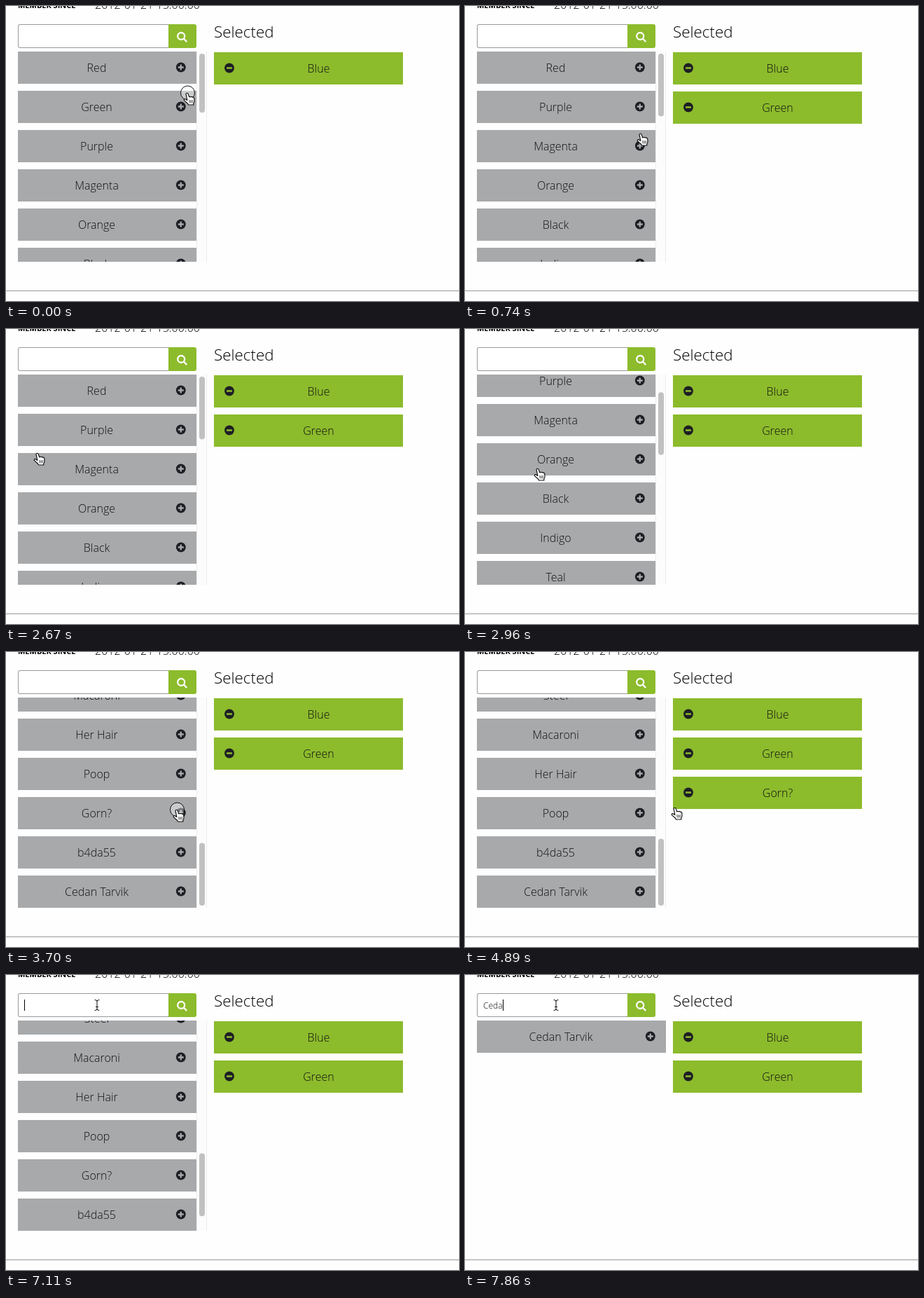
An HTML page with a canvas that plays this animation: 647x421 px, repeating every 8000 ms.

```html
<!DOCTYPE html>
<html lang="en">
<head>
<meta charset="utf-8">
<title>Colour picker</title>
<style>
  html, body { margin: 0; width: 100%; height: 100%; overflow: hidden; background: #fefefe; }
  canvas { display: block; width: 647px; height: 421px; }
</style>
</head>
<body>
<canvas id="stage" width="647" height="421"></canvas>
<script>
const ctx = document.getElementById('stage').getContext('2d');
const LOOP = 8000, STEP = LOOP / 54;
const PAPER = '#fefefe', GREEN = '#8cbb2c', GRAY = '#a7a9ab', DARK = '#1d1e24', INK = '#111';
const FAMILY = '"Open Sans", "Noto Sans", sans-serif';
const ROW = 56, CARD = 46, TOP = 65, VIEW = 300;

const NAMES = ['Red', 'Blue', 'Green', 'Purple', 'Magenta', 'Orange', 'Black', 'Indigo', 'Teal',
  'Brown', 'Silver', 'Gold', 'Steel', 'Macaroni', 'Her Hair', 'Poop', 'Gorn?', 'b4da55', 'Cedan Tarvik'];

// When each name enters and leaves the selection, in steps
const PICKS = [['Blue', 0, 99], ['Green', 1, 99], ['Magenta', 9, 16], ['Gorn?', 26, 37]];
const CLICKS = [0, 8, 15, 25, 36, 41];
const TYPED = { 52: 'Ce', 53: 'Ceda' };

// Pointer path: step, x, y
const PATH = [[0, 259, 124], [2, 257, 138], [4, 252, 172], [7, 248, 201], [8, 247, 203], [10, 247, 203],
  [12, 276, 203], [14, 316, 199], [15, 319, 197], [16, 319, 197], [17, 175, 182], [18, 45, 177],
  [19, 58, 186], [21, 150, 212], [23, 234, 224], [24, 244, 225], [29, 244, 225], [30, 249, 231],
  [31, 262, 238], [32, 281, 235], [33, 300, 222], [34, 321, 209], [37, 319, 203], [38, 286, 150],
  [39, 222, 88], [40, 156, 52], [41, 130, 43], [54, 130, 43]];
const SCROLL = [[0, 0], [19, 0], [20, 70], [21, 240], [22, 440], [23, 590], [24, 642], [54, 642]];

function at(keys, k) {
  const i = Math.max(1, keys.findIndex(p => p[0] >= k));
  const a = keys[i - 1], b = keys[i], f = (k - a[0]) / (b[0] - a[0]);
  return a.slice(1).map((v, j) => v + (b[j + 1] - v) * f);
}

function box(x, y, w, h, color, r = 0) {
  ctx.fillStyle = color;
  ctx.beginPath();
  ctx.roundRect(x, y, w, h, r);
  ctx.fill();
}

function text(s, x, y, size = 16, align = 'left', weight = 300, color = INK) {
  ctx.font = `${weight} ${size}px ${FAMILY}`;
  ctx.textAlign = align;
  ctx.fillStyle = color;
  ctx.fillText(s, x, y);
}

function sign(x, y, color, plus) {
  ctx.fillStyle = DARK;
  ctx.beginPath();
  ctx.arc(x, y, 6.9, 0, 7);
  ctx.fill();
  box(x - 4, y - 1.15, 8, 2.3, color, 0.5);
  if (plus) box(x - 1.15, y - 4, 2.3, 8, color, 0.5);
}

function drawPage() {
  box(0, 0, 647, 421, PAPER);
  text('MEMBER SINCE', 17, 3, 11, 'left', 700, '#000');
  text('2012-01-21 15:00:00', 127, 4, 16, 'left', 300, '#000');
  text('Selected', 297, 45, 22.4, 'left', 300, '#000');
  box(0, 406, 647, 1, '#999');
}

function drawSearch(typed, caret) {
  box(17, 26, 216, 34, '#999', [3, 0, 0, 3]);
  box(18, 27, 214, 32, '#fff', [2, 0, 0, 2]);
  box(232, 26, 40, 34, GREEN, [0, 3, 3, 0]);
  ctx.strokeStyle = '#fff';
  ctx.lineCap = 'round';
  ctx.lineWidth = 2.3;
  ctx.beginPath();
  ctx.arc(250.2, 43, 5, 0, 7);
  ctx.moveTo(254.2, 47);
  ctx.lineTo(257.6, 50.4);
  ctx.stroke();
  text(typed, 26, 48, 12);
  if (caret) box(26 + Math.round(ctx.measureText(typed).width), 35, 1, 16, '#000');
}

function drawList(names, scroll) {
  const height = names.length * ROW - 10, long = height > VIEW;
  const width = long ? 255 : 270;
  const offset = long ? Math.min(scroll, height - VIEW) : 0;
  ctx.save();
  ctx.beginPath();
  ctx.rect(17, TOP, 270, VIEW);
  ctx.clip();
  names.forEach((name, i) => {
    const y = Math.round(TOP + i * ROW - offset);
    if (y > TOP + VIEW || y + CARD < TOP) return;
    box(17, y, width, CARD, GRAY);
    text(name, 17 + (width - 30) / 2, y + 29, 16, 'center');
    sign(17 + width - 22.2, y + 22.5, GRAY, true);
  });
  if (long) {
    const scale = VIEW / height;
    box(272, TOP, 15, VIEW, '#fcfcfc');
    box(272, TOP, 1, VIEW, '#ececec');
    box(286, TOP, 1, VIEW, '#ececec');
    box(276, TOP + 3 + offset * scale, 8, VIEW * scale - 6, '#c1c1c1', 4);
  }
  ctx.restore();
}

function drawSelected(names) {
  names.forEach((name, i) => {
    const y = TOP + 1 + i * ROW;
    box(297, y, 270, CARD, GREEN);
    text(name, 446.5, y + 29, 16, 'center');
    sign(319, y + 22.5, GREEN, false);
  });
}

const HAND = new Path2D('M-2 1.4Q-1-.6.9.9L2.8 6Q3.6 4.6 5.2 5.8Q6.6 4.9 7.5 6.3' +
  'Q9.2 5.8 9.7 7.4L10 11Q10 13 8.8 15.2V17H1.4L.6 15.2-4.6 10.6Q-5.2 8.4-3.2 8.6L-.2 10.4Z');
const FINGERS = new Path2D('M2.8 10.5L3.2 14M5 10.5L5.2 14M7.2 10.5V14');
const BEAM = new Path2D('M-3-7.5Q0-7.5 0-5.5Q0-7.5 3-7.5M0-5.5V5.5M-3 7.5Q0 7.5 0 5.5Q0 7.5 3 7.5M-1.5 2.5H1.5');

function drawPointer(x, y, ring) {
  const inField = y > 26 && y < 60 && x < 232;
  ctx.save();
  ctx.translate(x, y);
  ctx.strokeStyle = '#111';
  ctx.lineJoin = 'round';
  ctx.lineWidth = 1;
  if (ring) {
    ctx.fillStyle = 'rgba(255,255,255,.4)';
    ctx.beginPath();
    ctx.arc(0.5, 0, 10, 0, 7);
    ctx.fill();
    ctx.stroke();
  }
  if (inField) {
    ctx.stroke(BEAM);
  } else {
    ctx.fillStyle = '#fff';
    ctx.fill(HAND);
    ctx.lineWidth = 1.2;
    ctx.stroke(HAND);
    ctx.lineWidth = 0.8;
    ctx.stroke(FINGERS);
  }
  ctx.restore();
}

function draw(t) {
  const k = Math.min(53, Math.floor((t + 8) / STEP));
  const selected = PICKS.filter(p => k >= p[1] && k < p[2]).map(p => p[0]);
  const typed = TYPED[k] || '';
  const caret = k >= 42 && (typed !== '' || Math.floor((k - 42) / 3) % 2 === 0);
  const listed = NAMES.filter(n => !selected.includes(n) && n.toLowerCase().includes(typed.toLowerCase()));
  // Removing a row at the end pulls the scroll back for good
  const scroll = Math.min(at(SCROLL, k)[0], k >= 26 ? 586 : 642);
  const [x, y] = at(PATH, k);
  drawPage();
  drawSearch(typed, caret);
  drawList(listed, scroll);
  drawSelected(selected);
  drawPointer(Math.round(x), Math.round(y), CLICKS.includes(k));
}

const start = performance.now();
function tick() {
  draw((performance.now() - start) % LOOP);
  requestAnimationFrame(tick);
}
tick();
</script>
</body>
</html>
```
